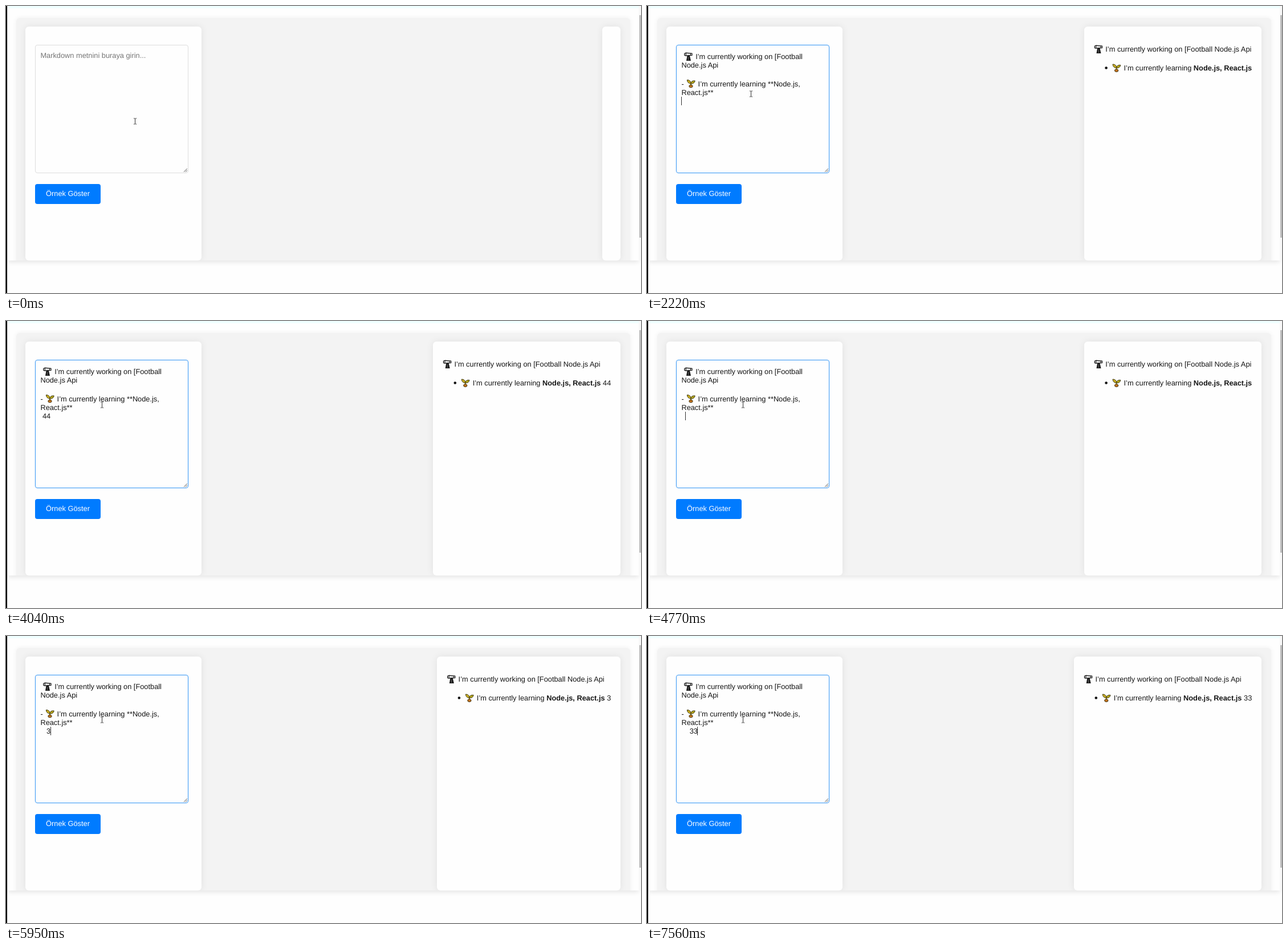
These frames come from a looping animation (1114x503 px, 8 s). An HTML page:

```html
<!DOCTYPE html>
<html lang="tr">
<head>
<meta charset="utf-8">
<title>Markdown</title>
<style>
html, body { margin: 0; width: 100%; height: 100%; overflow: hidden; background: #fefefe; }
#stage { position: absolute; left: 0; top: 0; width: 1114px; height: 503px; overflow: hidden; background: #fefefe; }
#stage div { position: absolute; box-sizing: border-box; }
#page { left: 3px; top: -20px; width: 1107px; height: 466px; background: #fefefe; box-shadow: 0 3px 8px rgba(0,0,0,.1); overflow: hidden; }
#strip { left: 0; top: 20px; width: 1107px; height: 4px; background: #f0ffff; }
#box { left: 15px; top: 41px; width: 1077px; height: 460px; border-radius: 6px; background: #f3f3f3; box-shadow: 0 0 8px rgba(0,0,0,.06); }
.card { top: 56px; height: 410px; border-radius: 6px; background: #fefefe; box-shadow: 0 0 13px rgba(0,0,0,.08); }
#left { left: 31px; width: 309px; }
#edge { left: 0; top: 0; width: 2px; height: 503px; background: #000; }
#track { left: 1110px; top: 0; width: 4px; height: 446px; background: #f8f8f8; }
#thumb { left: 1111px; top: 16px; width: 3px; height: 390px; background: #bdbdbd; }
#area { left: 50.5px; top: 68px; width: 269.5px; height: 224.5px; border: 1px solid; border-radius: 4px; }
#button { left: 51px; top: 312px; width: 115px; height: 35px; border-radius: 4px; background: #007bff; }
svg { position: absolute; left: 0; top: 0; }
text { font: 12.8px "Liberation Sans", Arial, sans-serif; fill: #151515; white-space: pre; text-rendering: geometricPrecision; }
.bold { font-weight: bold; }
</style>
</head>
<body>
<div id="stage">
  <div id="page">
    <div id="strip"></div>
    <div id="box"></div>
    <div id="left" class="card"></div>
    <div id="panel" class="card"></div>
  </div>
  <div id="edge"></div>
  <div id="track"></div>
  <div id="thumb"></div>
  <div id="area"></div>
  <div id="button"></div>
  <svg width="1114" height="503" viewBox="0 0 1114 503">
    <defs>
      <g id="scope" stroke-linejoin="round">
        <path d="M5.5 6H10L12 15H4Z" fill="#1b1b1b"/>
        <path d="M7.7 8V14" stroke="#777" stroke-width=".8"/>
        <path d="M.8 2.2 3 1.2 14 2.2V5.4L3 6.2.8 5.4Z" fill="#e8e8e8" stroke="#111" stroke-width="1.2"/>
        <path d="M3.3 1.4V6M11.5 2V5.6" stroke="#111" stroke-width="1"/>
      </g>
      <g id="sprout" stroke="#2b2609" stroke-width=".9" stroke-linejoin="round">
        <path d="M7.2 7.5 7.6 11.5" stroke="#8a7a18" stroke-width="2"/>
        <path d="M7.5 8C3.5 8 1 5.5.8 1.6 5 1.5 7.6 4 7.5 8Z" fill="#c9ae22"/>
        <path d="M7.3 8C7.4 4.4 10 2.6 14.6 3 14.3 6.4 11.4 8.6 7.3 8Z" fill="#b3a51d"/>
        <ellipse cx="7.4" cy="12.6" rx="3.2" ry="2.3" fill="#c9761f"/>
      </g>
    </defs>
    <path d="M312 290.8 317.8 285M315 290.8 317.8 288" stroke="#555" stroke-width="1" fill="none"/>
    <text x="108.5" y="333" text-anchor="middle" style="fill:#fff">Örnek Göster</text>
    <text id="hint" x="60.4" y="91" style="fill:#757575">Markdown metnini buraya girin...</text>
    <g id="source">
      <use href="#scope" x="65" y="81"/>
      <text x="85.2" y="93">I’m currently working on [Football</text>
      <text x="60.4" y="108">Node.js Api</text>
      <text x="60.4" y="141">-</text>
      <use href="#sprout" x="69.6" y="128"/>
      <text x="89.6" y="141">I’m currently learning **Node.js,</text>
      <text x="60.4" y="156">React.js**</text>
      <text id="tail" y="171"></text>
    </g>
    <g id="preview">
      <use href="#scope" x="17.5" y="68"/>
      <text x="37.3" y="80">I’m currently working on [Football Node.js Api</text>
      <circle cx="38.6" cy="108.5" r="2.3" fill="#111"/>
      <use href="#sprout" x="49.2" y="100.5"/>
      <text x="69.5" y="113">I’m currently learning <tspan class="bold">Node.js, React.js</tspan><tspan id="extra"></tspan></text>
    </g>
    <rect id="caret" width="1" height="15" fill="#333"/>
    <path id="mouse" d="M-2.5-5H-.7L0-4.4.7-5H2.5M-2.5 5H-.7L0 4.4.7 5H2.5M0-4.4V4.4" stroke="#333" stroke-width="1" fill="none"/>
  </svg>
</div>
<script>
const LOOP = 8000, TEXT_X = 60.4, SPACE = 3.557, DIGIT = 7.117;
const FOCUS = 400, PASTE = 930, ENTER = 2220;
const $ = id => document.getElementById(id);

// time, typed last line, caret visible
const typing = [
  [ENTER, '', 1], [2750, '', 0], [3160, ' ', 1], [3360, ' 4', 1], [3510, ' 44', 1],
  [4040, ' 44', 0], [4240, ' 4', 0], [4370, ' ', 0], [4570, ' ', 1], [4770, '  ', 1],
  [4900, '  3', 1], [5430, '  3', 0], [5650, '  ', 0], [5890, '   ', 1], [5950, '   3', 1],
  [6480, '   3', 0], [6750, '   ', 0], [7010, '    ', 1], [7230, '    3', 1], [7560, '    33', 1]
];

// time, x, y of the pointer
const path = [
  [0, 226.5, 202], [40, 226.5, 202], [540, 162.5, 106], [1130, 162.5, 106],
  [1430, 119.5, 191], [1760, 182.5, 154], [2920, 182.5, 154], [3160, 168.5, 147], [LOOP, 168.5, 147]
];

const clamp = v => Math.max(0, Math.min(1, v));
const mix = (a, b, k) => a + (b - a) * k;
const show = (el, on) => el.setAttribute('visibility', on ? 'visible' : 'hidden');

function pointer(t) {
  const i = Math.max(1, path.findIndex(p => p[0] > t));
  const [a, b] = [path[i - 1], path[i]];
  const k = clamp((t - a[0]) / (b[0] - a[0])), e = k * k * (3 - 2 * k);
  return [mix(a[1], b[1], e), mix(a[2], b[2], e)];
}

function placeCaret(x, y, on) {
  $('caret').setAttribute('x', Math.floor(x));
  $('caret').setAttribute('y', y);
  show($('caret'), on);
}

function render(t) {
  const pasted = t >= PASTE;
  const [, line, lit] = typing.filter(s => s[0] <= t).pop() || [0, '', 0];
  const digits = line.trim(), indent = (line.length - digits.length) * SPACE;
  const extra = digits ? SPACE + digits.length * DIGIT : 0;
  const edge = pasted ? 767 - extra : 1046;

  const f = clamp((t - FOCUS) / 180);
  $('area').style.borderColor = `rgb(${mix(221, 61, f)},${mix(221, 154, f)},${mix(221, 245, f)})`;
  $('area').style.boxShadow = `0 0 3px rgba(0,123,255,${.16 * f})`;

  show($('hint'), !pasted);
  show($('source'), pasted);
  show($('preview'), pasted);
  $('panel').style.left = edge - 3 + 'px';
  $('panel').style.width = 1078 - edge + 'px';
  $('preview').setAttribute('transform', `translate(${edge} 0)`);
  $('extra').textContent = digits ? ' ' + digits : '';
  $('tail').textContent = digits;
  $('tail').setAttribute('x', TEXT_X + indent);

  if (!pasted) placeCaret(TEXT_X, 79, t >= FOCUS);
  else if (t < ENTER) placeCaret(120.2, 144, t < 1460 || t >= 1690);
  else placeCaret(TEXT_X + indent + digits.length * DIGIT, 159, lit);

  $('mouse').setAttribute('transform', `translate(${pointer(t).join(' ')})`);
}

const start = performance.now();
function tick() {
  render((performance.now() - start) % LOOP);
  requestAnimationFrame(tick);
}
render(0);
requestAnimationFrame(tick);
</script>
</body>
</html>
```
